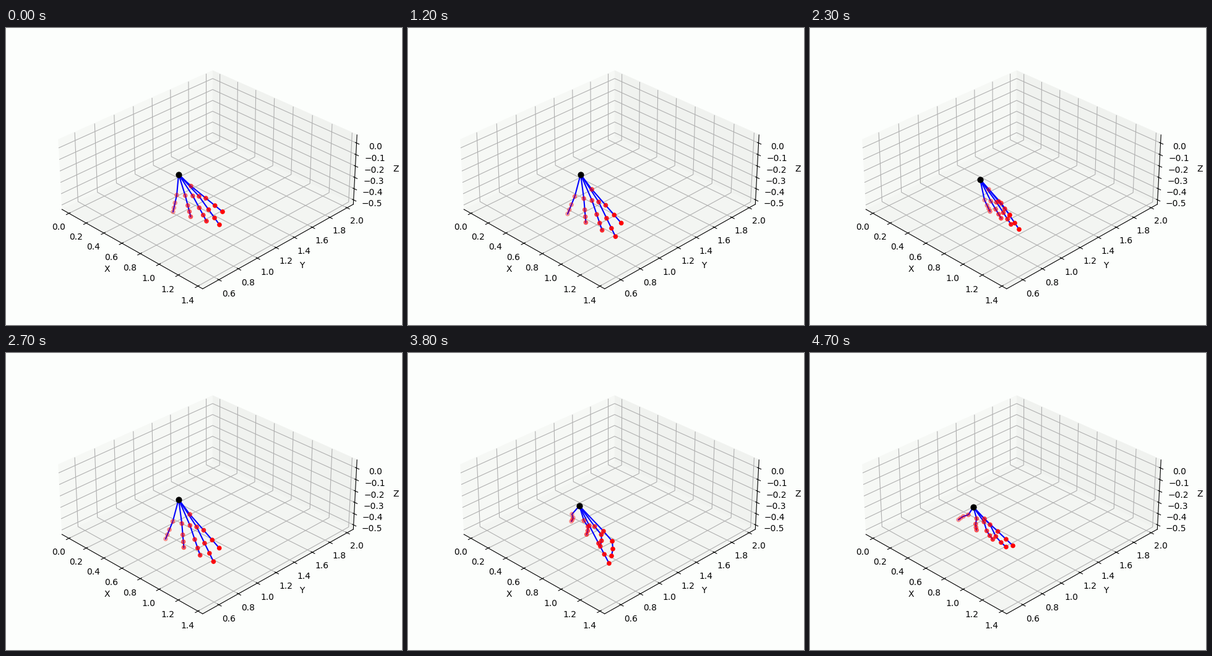
A matplotlib script for the animation above (4800 ms loop, 640 px wide and 480 px high).

```python
import numpy as np
import matplotlib.pyplot as plt
from matplotlib.animation import FuncAnimation

W, H, DPI = 640, 480, 100
FRAMES, INTERVAL = 48, 100
PAPER = "#fcfefc"

FAN = np.array([0, .38, .72, 1])     # spacing of the four fingers
ALONG = np.array([0, .47, .76, 1])   # spacing of the joints in a finger
BOW = np.array([0, 1, .65, 0])       # how far each joint leaves the chord

# Stage points as x + yj. After the wrist, all are relative to it:
# outer knuckles, outer fingertips, thumb base and tip; last is the curl.
SPREAD = np.array([279+236.5j, -3+33.5j, 33+35.5j, -9+60.5j, 66+81.5j,
                   20+19j, 71+60.5j, 0])
CLAW = np.array([275+237.5j, -15+20j, 7+37j, -30+45.5j, 22+62.5j,
                 -7+5j, -35+3j, .2])
RELAXED = np.array([270+244.5j, 2+21.5j, 33+28.5j, -12+32j, 61+62.5j,
                    20+16j, 60+48j, .08])
NARROW = np.array([275+245j, 7+33j, 34+38j, 16+51.5j, 63+80.5j,
                   14+16j, 48+57j, 0])
OPEN = np.array([261+228.5j, -24+16j, 2+37j, -47+32.5j, 25+72j,
                 -9+3j, -50+5j, .17])
BENT = np.array([277+247j, -12+13.5j, 39+41j, -13+25j, 52+81j,
                 16+32j, 48+93j, -.2])
LOOSE = np.array([264+249j, -8+12.5j, 27+28.5j, -24+20.5j, 53+64.5j,
                  18+19j, 64+62.5j, .08])

REACH = SPREAD.copy()
REACH[1:7] *= 1.1 * np.exp(.17j)

KEYS = {0: SPREAD, 7: CLAW, 12: REACH, 18: RELAXED, 23: NARROW, 27: REACH,
        31: OPEN, 34: REACH, 38: BENT, 42: REACH, 47: LOOSE}
TIMES = list(KEYS)
TRACKS = np.array(list(KEYS.values())).T


def hand_at(frame):
    """Wrist, and a 5 x 4 array of joints with the thumb last."""
    wrist, k0, k1, t0, t1, base, end, curl = (
        np.interp(frame, TIMES, track) for track in TRACKS)
    knuckles = np.append(k0 + (k1 - k0) * FAN, base)[:, None]
    tips = np.append(t0 + (t1 - t0) * FAN, end)[:, None]
    bend = np.array([1, 1, 1, 1, 0])[:, None] * curl.real
    path = ALONG + 1j * bend * BOW
    return wrist, wrist + knuckles + (tips - knuckles) * path


fig = plt.figure(figsize=(W / DPI, H / DPI), dpi=DPI, facecolor=PAPER)

ax = fig.add_axes([0, 0, 1, 1], projection="3d")
ax.set_facecolor(PAPER)
limits = np.array([(-.082, 1.448), (.437, 2.074), (-.539, .070)])
ax.set(xlim=limits[0], ylim=limits[1], zlim=limits[2],
       xlabel="X", ylabel="Y", zlabel="Z")
ax.set_box_aspect(np.ptp(limits, axis=1))
ax.view_init(elev=30, azim=-45)
for axis, color in zip((ax.xaxis, ax.yaxis, ax.zaxis),
                       ("#f6f8f5", "#f0f2ef", "#f3f5f2")):
    axis.set_pane_color(color)

# The hand is laid over the box in stage pixels.
stage = fig.add_axes([0, 0, 1, 1])
stage.set(xlim=(0, W), ylim=(H, 0))
stage.axis("off")
bones = [stage.plot([], [], color="blue", lw=1.5, zorder=2)[0]
         for _ in range(5)]
dots = stage.scatter(np.zeros(20), np.zeros(20), s=20, c="red", zorder=3)
palm = stage.scatter([0], [0], s=40, c="black", zorder=4)


def update(frame):
    wrist, joints = hand_at(frame)
    for bone, finger in zip(bones, joints):
        chain = np.append(wrist, finger)
        bone.set_data(chain.real, chain.imag)

    # Joints further left lie deeper in the box and fade.
    flat = joints.ravel()
    near = (flat.real - flat.real.min()) / np.ptp(flat.real)
    colors = np.zeros((flat.size, 4))
    colors[:, 0] = 1
    colors[:, 3] = .3 + .7 * near
    dots.set_offsets(np.column_stack([flat.real, flat.imag]))
    dots.set_color(colors)
    palm.set_offsets([(wrist.real, wrist.imag)])
    return [*bones, dots, palm]


anim = FuncAnimation(fig, update, frames=FRAMES, interval=INTERVAL,
                     repeat=True, repeat_delay=0, blit=False)
plt.show()
```
